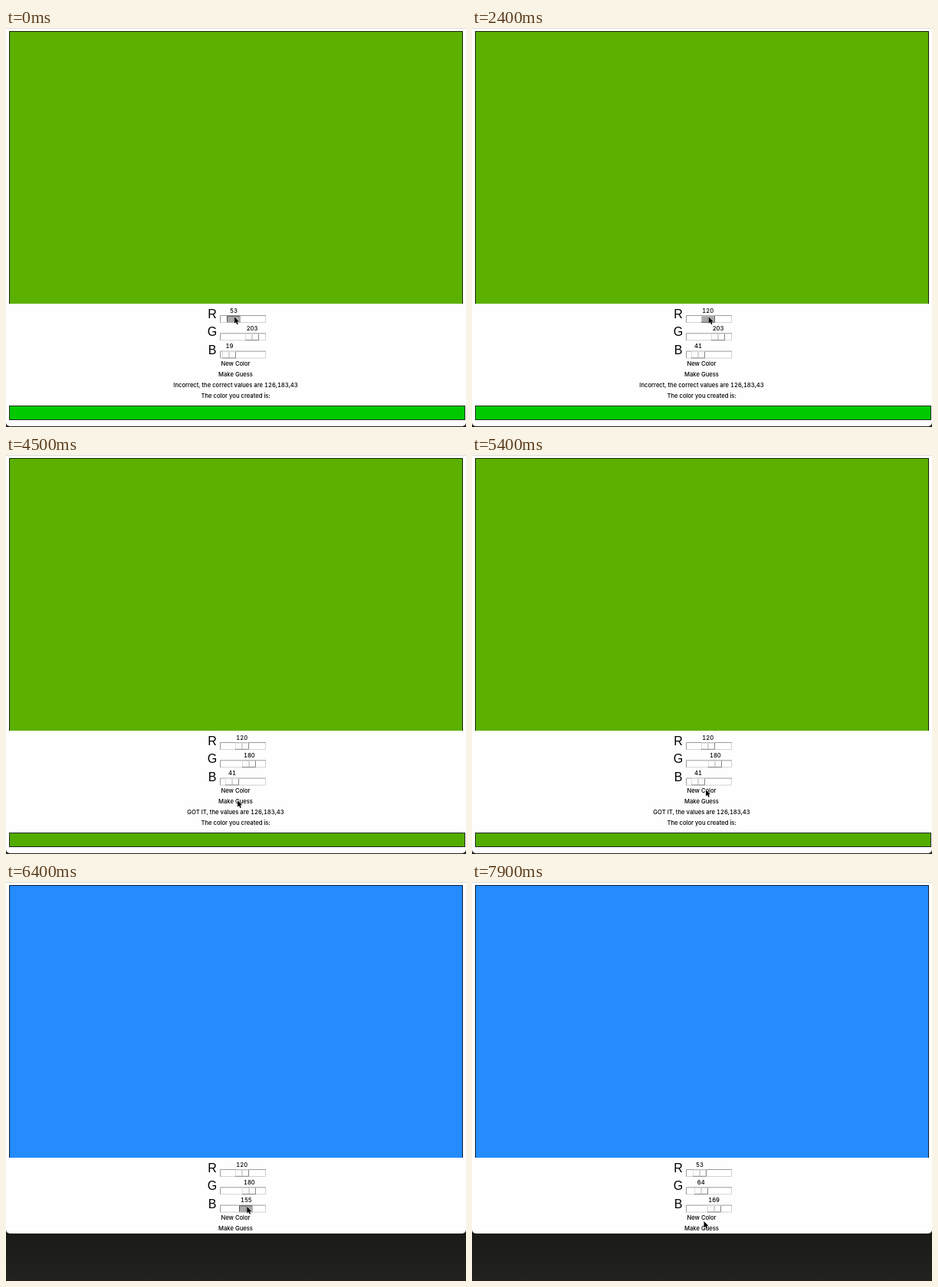
Animation of 600 by 521 pixels, one loop 8000 ms. Source, as an HTML page:

```html
<!DOCTYPE html>
<html lang="en">
<head>
<meta charset="utf-8">
<title>Color guessing game</title>
<style>
  html, body { margin: 0; width: 100%; height: 100%; overflow: hidden; background: #20211d; }
  svg { display: block; width: 600px; height: 521px; }
  text { text-anchor: middle; fill: #000; }
  .ui { font: 500 7.63px Inter, "Open Sans", sans-serif; font-variant-numeric: tabular-nums; }
  .big { font: 16px "Liberation Sans", Arial, sans-serif; }
</style>
</head>
<body>
<svg id="stage" viewBox="0 0 600 521">
  <defs>
    <linearGradient id="shade" x1="0" y1="0" x2="0" y2="1">
      <stop offset="0" stop-color="#171814"/>
      <stop offset="1" stop-color="#22231f"/>
    </linearGradient>
  </defs>
</svg>
<script>
const LOOP = 8000, STEP = 100, DWELL = 100;
const GUESS = 4500, NEW_COLOR = 5500;
const MID = 299.5;
const stage = document.getElementById('stage');

function add(tag, attrs, parent = stage) {
  const el = document.createElementNS('http://www.w3.org/2000/svg', tag);
  set(el, attrs);
  parent.appendChild(el);
  return el;
}
function set(el, attrs) {
  for (const key in attrs) el.setAttribute(key, attrs[key]);
}
function label(str, x, y, cls = 'ui', parent = stage) {
  const el = add('text', { x, y, class: cls }, parent);
  el.textContent = str;
  return el;
}
const box = (x, y, width, height, fill, parent) =>
  add('rect', { x, y, width, height, fill }, parent);
const line = (d, stroke, parent) => add('path', { d, stroke, fill: 'none' }, parent);

const mix = (a, b, p) => a + (b - a) * p;
const clamp = p => Math.max(0, Math.min(1, p));
const easeOut = p => 1 - (1 - p) ** 2;
const easeBoth = p => p * p * (3 - 2 * p);

// Window and its contents
box(0, 440, 600, 81, 'url(#shade)');
const pane = add('rect', { x: 0, y: -10, width: 600, rx: 5, fill: '#fefefe' });
box(0, 0, 600, 1, '#dedede');
const sample = box(4, 4, 592, 356);
set(line('M4.5 360V4.5H595.5V360', '#000'), { 'stroke-opacity': .8 });

const [R, G, B] = [['R', 53], ['G', 203], ['B', 19]].map(makeSlider);

label('New Color', MID, 441.4);
label('Make Guess', MID, 454.8);
const result = add('g', {});
const verdict = label('', MID, 468.5, 'ui', result);
label('The color you created is:', MID, 482.7, 'ui', result);
const swatch = add('rect', { x: 4.5, y: 493.5, width: 594, height: 18, stroke: '#000', 'stroke-opacity': .8 }, result);

const arrow = add('path', {
  d: 'M0 0V8.6L2 6.8L3.4 9.9L4.8 9.3L3.5 6.3H6.1Z',
  fill: '#000', stroke: '#fff', 'stroke-width': .7, 'paint-order': 'stroke'
});

function makeSlider([name, first], row) {
  const y = 375 + row * 23.3;
  label(name, 269, y + 4, 'big');
  const text = label('', 0, y - 3.2);
  box(279, y, 60, 10, '#fff');
  line(`M279 ${y + 9.5}H338.5V${y + .5}`, '#d2d2d2');
  line(`M279.5 ${y + 9.5}V${y + .5}H339`, '#9b9b9b');
  const thumb = add('g', {});
  return {
    y, first, text, thumb, last: first, drags: [],
    face: box(0, .8, 18, 8.8, '#fff', thumb),
    lit: line('M.5 9.5V1.2H17.5', '', thumb),
    low: line('M0 9.3H17.5V1', '', thumb),
    notch: line('M9 1.5V9', '', thumb)
  };
}

const thumbMid = v => 288.4 + v * .161;

function valueAt(s, t) {
  let v = s.first;
  for (const d of s.drags) v = mix(v, d.to, easeOut(clamp((t - d.start) / (d.end - d.start))));
  return Math.round(v);
}

// What the hand does: drag a slider to a value, or rest at a point
function drag(s, start, end, to) {
  const act = { start, end, to, pos: t => [thumbMid(valueAt(s, t)) + 1, s.y + 2.3] };
  s.drags.push(act);
  return act;
}
const rest = (x, y, start, end = start) => ({ start, end, pos: () => [x, y] });

const acts = [
  drag(R, 0, 400, 86),
  rest(319, 406, 800),
  drag(B, 1200, 1520, 41),
  drag(R, 1900, 2400, 120),
  drag(G, 3100, 3400, 180),
  drag(G, 3600, 3800, 180),
  rest(302, 451, 4400, 4700),
  rest(305, 437, 5300),
  rest(276, 438, 5600),
  drag(B, 6200, 6500, 169),
  drag(G, 6800, 7170, 64),
  drag(R, 7500, 7700, 53),
  rest(302.5, 443, 8000)
];

function pointerAt(t) {
  const i = acts.findLastIndex(a => a.start - DWELL <= t);
  const here = acts[i], next = acts[i + 1];
  const leave = here.end + DWELL;
  if (!next || t <= leave) return here.pos(t);
  const p = easeBoth(clamp((t - leave) / (next.start - DWELL - leave)));
  const goal = next.pos(next.start);
  return here.pos(t).map((v, n) => mix(v, goal[n], p));
}

function drawSlider(s, t, [px, py]) {
  const v = valueAt(s, t), mid = thumbMid(v), left = Math.round(mid - 9);
  const down = s.drags.some(d => t >= d.start && t < d.end);
  const over = px >= left && px <= left + 18 && py >= s.y && py <= s.y + 10;
  s.text.textContent = v;
  set(s.text, { x: mid });
  set(s.thumb, { transform: `translate(${left} ${s.y})` });
  set(s.face, { fill: down || over ? '#a9a9a9' : '#fdfdfd' });
  set(s.lit, { stroke: down ? '#555' : over ? '#c4c4c4' : '#dcdcdc' });
  set(s.low, { stroke: down ? '#b5b5b5' : over ? '#666' : '#858585' });
  set(s.notch, { stroke: down || over ? '#868686' : '#b0b0b0' });
}

function draw(now) {
  const t = Math.floor(now % LOOP / STEP) * STEP;
  const fresh = t >= NEW_COLOR, won = t >= GUESS;
  const tip = pointerAt(t);
  set(pane, { height: fresh ? 469 : 530 });
  set(sample, { fill: fresh ? '#248cff' : '#5cb000' });
  set(result, { visibility: fresh ? 'hidden' : 'visible' });
  verdict.textContent = (won ? 'GOT IT, the' : 'Incorrect, the correct') + ' values are 126,183,43';
  set(swatch, { fill: won ? '#52ad00' : '#00c900' });
  for (const s of [R, G, B]) drawSlider(s, t, tip);
  set(arrow, { transform: `translate(${tip})` });
}

const start = performance.now();
function tick() {
  draw(performance.now() - start);
  requestAnimationFrame(tick);
}
tick();
</script>
</body>
</html>
```
